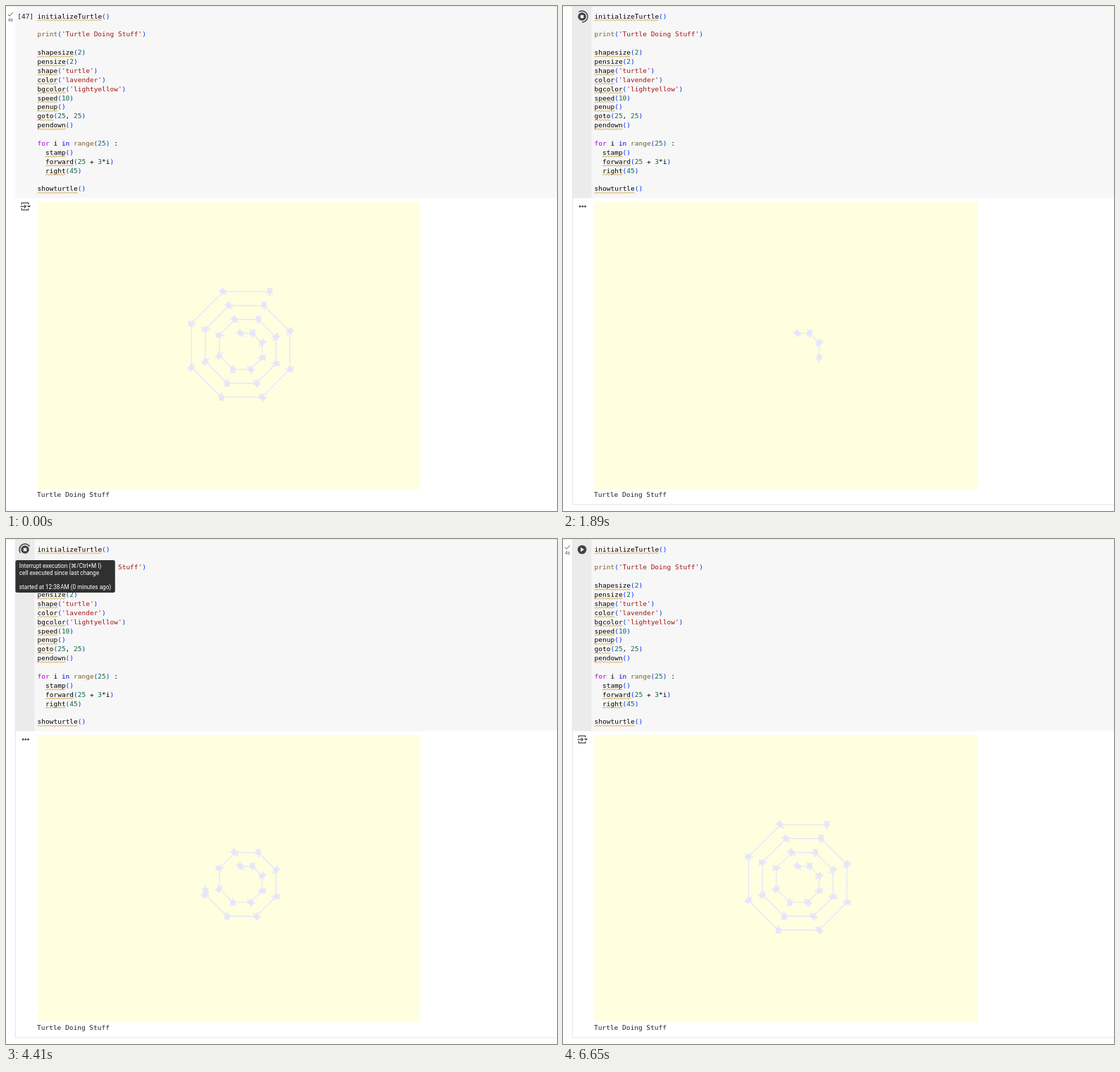
These frames come from a looping animation (782x716 px, 7.91 s). An HTML page with a canvas:

```html
<!DOCTYPE html>
<html lang="en">
<head>
<meta charset="utf-8">
<title>Turtle spiral</title>
<style>
html, body { margin: 0; width: 782px; height: 716px; overflow: hidden; background: #fff; }
canvas { display: block; width: 782px; height: 716px; }
</style>
</head>
<body>
<canvas id="stage"></canvas>
<script>
const W = 782, H = 716, LOOP = 7910;
const dpr = window.devicePixelRatio || 1;

function setup(canvas) {
  canvas.width = W * dpr;
  canvas.height = H * dpr;
  const context = canvas.getContext('2d');
  context.scale(dpr, dpr);
  return context;
}
const stage = setup(document.getElementById('stage'));
const layer = setup(document.createElement('canvas'));
let ctx = stage;

const MONO = '9.5px "DejaVu Sans Mono", "Liberation Mono", monospace';
const SANS = '8.2px Roboto, "DejaVu Sans", sans-serif';
const DARK = '#424242', LAVENDER = '#e6e6fa';
const CHAR = 5.715, LINE = 12.885, CODE_X = 44.6, CODE_Y = 17.6;

// Key times of the notebook cell
const HOVER = 770, QUEUED = 1260, RUNNING = 1330, OUTPUT = 1400, DONE = 6600;

// Words wrapped in ~ ~ carry a squiggle
const CODE = [
  '~initializeTurtle~()', '', "print('Turtle Doing Stuff')", '',
  '~shapesize~(2)', '~pensize~(2)', "~shape~('turtle')", "~color~('lavender')",
  "~bgcolor~('lightyellow')", '~speed~(10)', '~penup~()', '~goto~(25, 25)', '~pendown~()', '',
  'for i in range(25) :', '  ~stamp~()', '  ~forward~(25 + 3*i)', '  ~right~(45)', '',
  '~showturtle~()'
];
const WORDS = { print: '#795e26', range: '#795e26', for: '#af00db', in: '#0000ff' };

// Spiral corners: 25 moves, each 3 units longer, turning 45 degrees
const UNIT = 0.68, MOVES = 25;
const corners = [{ x: 333, y: 464.2 }];
for (let i = 0; i < MOVES; i++) {
  const d = (25 + 3 * i) * UNIT, a = i * Math.PI / 4, p = corners[i];
  corners.push({ x: p.x + d * Math.cos(a), y: p.y + d * Math.sin(a) });
}

// Half outline of the turtle: along the heading, across it
const HALF = [[16, 0], [14, 2], [10, 1], [7, 4], [9, 7], [8, 9], [5, 6], [1, 7],
  [-3, 5], [-6, 8], [-8, 6], [-5, 4], [-7, 0]];
const SHELL = HALF.concat(HALF.slice(1, -1).reverse().map(([x, y]) => [x, -y]));

const clamp = v => Math.max(0, Math.min(1, v));
const ramp = (t, a, b) => clamp((t - a) / (b - a));

function track(t, keys) {
  let i = 1;
  while (i < keys.length - 1 && t > keys[i][0]) i++;
  const [t0, v0] = keys[i - 1], [t1, v1] = keys[i];
  return v0 + (v1 - v0) * (t - t0) / (t1 - t0);
}

// Draws on a separate layer so that overlapping parts fade as one
function faded(alpha, draw) {
  if (alpha <= 0) return;
  layer.clearRect(0, 0, W, H);
  ctx = layer;
  draw();
  ctx = stage;
  ctx.globalAlpha = alpha;
  ctx.drawImage(layer.canvas, 0, 0, W, H);
  ctx.globalAlpha = 1;
}

function box(x, y, w, h, color) {
  ctx.fillStyle = color;
  ctx.fillRect(x, y, w, h);
}

function roundBox(x, y, w, h, r, color) {
  ctx.fillStyle = color;
  ctx.beginPath();
  ctx.roundRect(x, y, w, h, r);
  ctx.fill();
}

function disc(x, y, r, color) {
  ctx.fillStyle = color;
  ctx.beginPath();
  ctx.arc(x, y, r, 0, Math.PI * 2);
  ctx.fill();
}

function ring(x, y, r, from, to, width) {
  ctx.strokeStyle = DARK;
  ctx.lineWidth = width;
  ctx.beginPath();
  ctx.arc(x, y, r, from, to);
  ctx.stroke();
}

function path(points, close) {
  ctx.beginPath();
  points.forEach(([x, y], i) => i ? ctx.lineTo(x, y) : ctx.moveTo(x, y));
  if (close) ctx.closePath();
}

function stroke(points, color, width) {
  path(points);
  ctx.strokeStyle = color;
  ctx.lineWidth = width;
  ctx.stroke();
}

function fillPath(points, color) {
  path(points, true);
  ctx.fillStyle = color;
  ctx.fill();
}

function text(str, x, y, color, font) {
  ctx.font = font;
  ctx.fillStyle = color;
  ctx.fillText(str, x, y);
}

function squiggle(x0, x1, y) {
  const pts = [];
  for (let x = x0; x <= x1; x += 0.5) pts.push([x, y + 0.8 * Math.sin((x - x0) * Math.PI / 2)]);
  stroke(pts, '#bf8803', 0.8);
}

function tokenColor(token) {
  if (token[0] === "'") return '#a31515';
  if (/^\d/.test(token)) return '#116644';
  if (/[()]/.test(token)) return '#0431fa';
  return WORDS[token] || '#000';
}

function drawCode() {
  CODE.forEach((line, row) => {
    const y = CODE_Y + row * LINE;
    let x = CODE_X;
    for (const token of line.match(/~\w+~|'[^']*'|\w+|\s+|[()]|[^\w\s]/g) || []) {
      const marked = token[0] === '~';
      const word = marked ? token.slice(1, -1) : token;
      const end = x + word.length * CHAR;
      text(word, x, y, tokenColor(word), MONO);
      if (marked) squiggle(x, end, y + 2.4);
      x = end;
    }
  });
}

function drawTurtle(x, y, angle) {
  ctx.save();
  ctx.translate(x, y);
  ctx.rotate(angle);
  ctx.scale(0.5, 0.5);
  ctx.translate(-3, 0);
  fillPath(SHELL, LAVENDER);
  ctx.strokeStyle = LAVENDER;
  ctx.lineWidth = 1.4;
  ctx.stroke();
  ctx.restore();
}

function drawSpiral(t) {
  box(44.5, 277.7, 543.5, 407.3, '#ffffe0');
  const run = t < QUEUED ? MOVES : Math.max(0, Math.min(MOVES, track(t,
    [[OUTPUT, 0], [3010, 9.12], [3780, 10.78], [5110, 17.78], [6020, 22.73], [6440, MOVES]])));
  const step = Math.min(MOVES - 1, Math.floor(run));
  const move = clamp((run - step) / 0.75), turn = clamp((run - step - 0.75) / 0.25);
  const a = corners[step], b = corners[step + 1];
  const x = a.x + (b.x - a.x) * move, y = a.y + (b.y - a.y) * move;
  const trail = corners.slice(0, step + 1).map(p => [p.x, p.y]);
  ctx.lineJoin = 'round';
  stroke([...trail, [x, y]], LAVENDER, 1.36);
  for (let i = 0; i <= step; i++) drawTurtle(corners[i].x, corners[i].y, (i + 1) * Math.PI / 4);
  drawTurtle(x, y, (step + 2 * turn) * Math.PI / 4);
  text('Turtle Doing Stuff', 44, 696.3, '#212121', MONO);
}

function drawPlay() {
  disc(27, 15, 6.3, DARK);
  fillPath([[25.1, 11.9], [25.1, 18.1], [30, 15]], '#fff');
}

function drawQueued() {
  drawPlay();
  ctx.setLineDash([3.6, 1.6]);
  ring(27, 15, 8.28, 0, Math.PI * 2, 1.4);
  ctx.setLineDash([]);
}

function drawSpinner(t) {
  disc(27, 15, 5.8, DARK);
  box(24.8, 12.8, 4.4, 4.4, '#fff');
  const mid = track(t, [[3010, 120], [3780, 400], [5110, 1000], [6020, 1440]]) - 90;
  const half = (190 - 95 * Math.cos((t - 3780) / 2660 * Math.PI * 2)) / 2;
  ring(27, 15, 8, (mid - half) * Math.PI / 180, (mid + half) * Math.PI / 180, 1.5);
}

function drawStatus() {
  stroke([[2.8, 12], [5, 14.2], [9.8, 9.2]], '#555', 1);
  text('4s', 2.8, 21.8, '#555', '6.6px Roboto, sans-serif');
}

function drawOutputIcon() {
  stroke([[22.2, 281.8], [22.2, 279.2], [31.8, 279.2], [31.8, 281.6]], DARK, 1.2);
  stroke([[22.2, 286.6], [22.2, 289.2], [31.8, 289.2], [31.8, 287]], DARK, 1.2);
  stroke([[20.5, 284.2], [28.2, 284.2]], DARK, 1.2);
  stroke([[26, 281.9], [28.3, 284.2], [26, 286.5]], DARK, 1.2);
  fillPath([[29.8, 283], [35.2, 283], [32.5, 285.8]], DARK);
}

function drawTooltip() {
  roundBox(13.4, 30, 141.4, 46, 2.7, '#303030');
  text('Interrupt execution (\u2318/Ctrl+M I)', 18.8, 41, '#fff', SANS);
  text('cell executed since last change', 18.8, 51, '#fff', SANS);
  text('started at 12:38\u200aAM (0 minutes ago)', 18.8, 71, '#fff', SANS);
}

function drawFocus() {
  box(13.5, 0, 27, 272.3, '#ebebeb');
  stroke([[13.3, 0], [13.3, 707], [W, 707]], '#e4e4e4', 1);
}

function render(t) {
  box(0, 0, W, H, '#fff');
  box(13.5, 0, W - 13.5, 272.3, '#f7f7f7');

  const hover = ramp(t, HOVER - 50, 910);
  faded(hover, drawFocus);
  box(0, 0, W, 0.7, '#e2e2e2');

  const busy = t >= QUEUED && t < DONE;
  if (busy) {
    if (t < RUNNING) drawQueued(); else drawSpinner(t);
    [24.1, 27.8, 31.5].forEach(x => disc(x, 284.2, 1.35, DARK));
  } else {
    drawStatus();
    drawOutputIcon();
    faded(1 - hover, () => text('[47]', 16.2, CODE_Y, '#212121', MONO));
    faded(hover, drawPlay);
  }

  drawCode();
  if (t < QUEUED || t >= OUTPUT) drawSpiral(t);
  faded(ramp(t, 5320, 5390) * (1 - ramp(t, 6120, 6200)),
    () => roundBox(369, 711.3, 50, 9, 4, '#ebebeb'));
  faded(ramp(t, 3695, 3900) * (1 - ramp(t, 5972, 6052)), drawTooltip);
}

const start = performance.now();
function tick() {
  render((performance.now() - start) % LOOP);
  requestAnimationFrame(tick);
}
tick();
</script>
</body>
</html>
```
